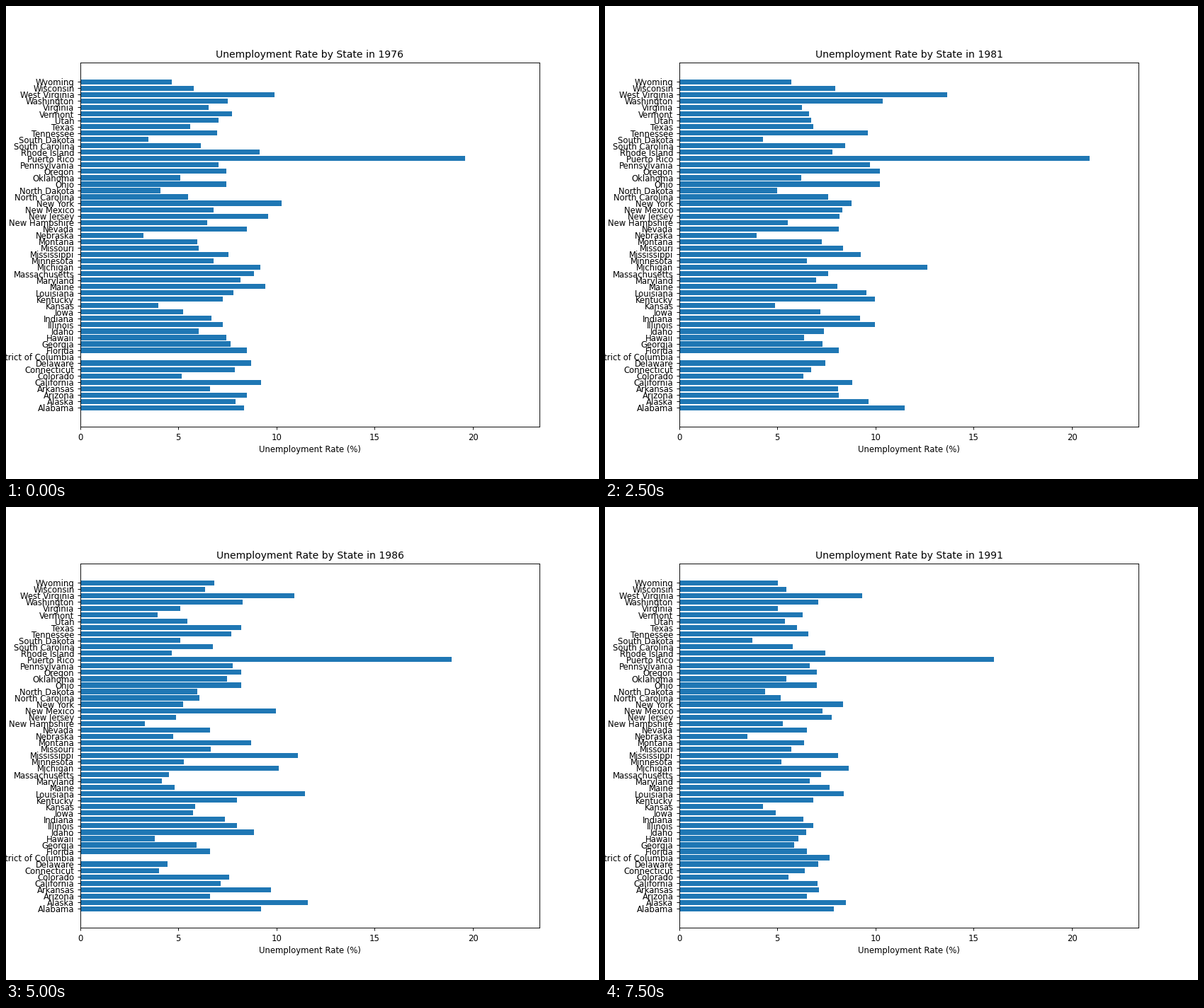
A matplotlib script that plays this animation: 837 px wide and 669 px high, repeating every 8 s.

```python
import numpy as np
import matplotlib.pyplot as plt
from matplotlib.animation import FuncAnimation

W, H = 837, 669
DPI = W / 10
START, FRAMES = 1976, 16
TURNS = [1976, 1979, 1982, 1984, 1986, 1988, 1991]

# Each region shares one cycle (rates at the turning years);
# a state scales it to its own mean rate.
REGIONS = [
    ([8.6, 5.85, 8.1, 5.5, 4.4, 3.35, 7.0], {
        "Connecticut": 5.6, "Delaware": 6.2, "District of Columbia": 6.7,
        "Hawaii": 5.3, "Maine": 6.7, "Maryland": 5.8, "Massachusetts": 6.3,
        "New Hampshire": 4.6, "New Jersey": 6.8, "New York": 7.3,
        "Rhode Island": 6.5, "Vermont": 5.5}),
    ([6.9, 5.9, 11.3, 8.7, 7.6, 5.75, 6.5], {
        "Alabama": 9.1, "Illinois": 7.9, "Indiana": 7.3, "Iowa": 5.7,
        "Kentucky": 7.9, "Michigan": 10.0, "Missouri": 6.6,
        "North Carolina": 6.0, "Ohio": 8.1, "Oregon": 8.1,
        "Pennsylvania": 7.7, "South Carolina": 6.7, "Tennessee": 7.6,
        "Washington": 8.2, "West Virginia": 10.8, "Wisconsin": 6.3}),
    ([5.6, 4.9, 7.8, 7.0, 8.2, 6.6, 6.0], {
        "Alaska": 9.3, "Arkansas": 7.8, "Colorado": 6.1, "Idaho": 7.1,
        "Kansas": 4.7, "Louisiana": 9.2, "Mississippi": 8.9, "Montana": 7.0,
        "Nebraska": 3.8, "New Mexico": 8.0, "North Dakota": 4.8,
        "Oklahoma": 6.0, "South Dakota": 4.1, "Texas": 6.6, "Wyoming": 5.5}),
    ([7.85, 5.1, 8.7, 6.4, 6.1, 5.1, 6.0], {
        "Arizona": 7.0, "California": 7.6, "Florida": 7.0, "Georgia": 6.3,
        "Minnesota": 5.6, "Nevada": 7.0, "Utah": 5.8, "Virginia": 5.4}),
    ([19.6, 17.1, 22.8, 20.7, 18.9, 15.0, 16.0], {"Puerto Rico": 18.6}),
]
FIRST_YEAR = {"District of Columbia": 1990}

STATES = sorted((name, mean, cycle) for cycle, means in REGIONS
                for name, mean in means.items())


def rate(name, mean, cycle, year):
    if year < FIRST_YEAR.get(name, START):
        return 0
    return mean * np.interp(year, TURNS, cycle) / np.mean(cycle)


# The small surplus keeps the pixel size from rounding down.
fig, ax = plt.subplots(figsize=((W + 0.01) / DPI, (H + 0.01) / DPI), dpi=DPI)
bars = ax.barh([name for name, *_ in STATES], [0] * len(STATES))
ax.set_xlim(0, 23.4)
ax.set_xlabel("Unemployment Rate (%)")
title = ax.set_title("")


def update(i):
    year = START + i
    for bar, state in zip(bars, STATES):
        bar.set_width(rate(*state, year))
    title.set_text(f"Unemployment Rate by State in {year}")
    return [*bars, title]


anim = FuncAnimation(fig, update, frames=FRAMES, interval=500, repeat=True,
                     repeat_delay=0, blit=False)
plt.show()
```
